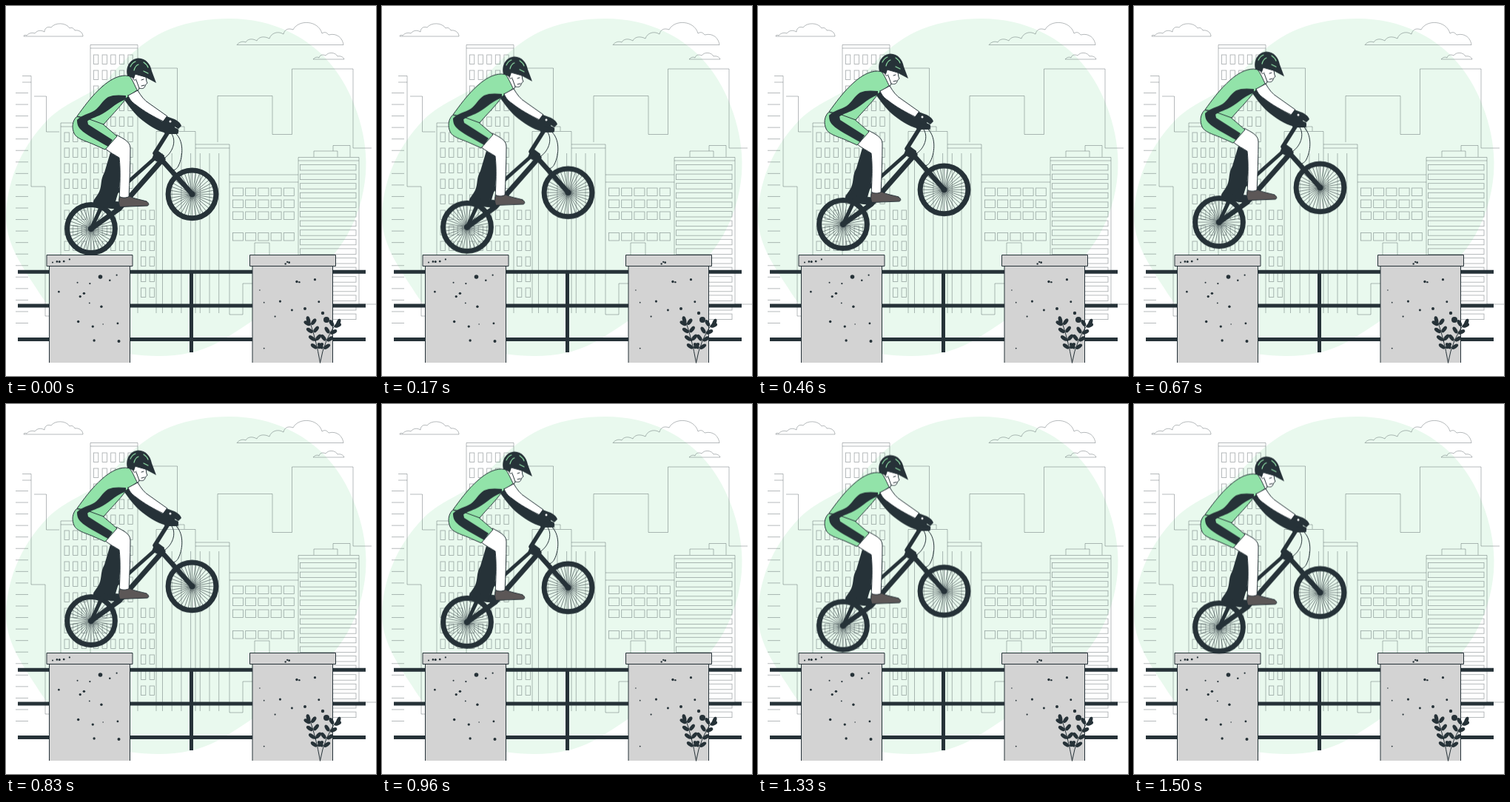
Write an HTML page that moves like this. It is 500 px wide and 500 px high and loops after 1540 ms.

```html
<!DOCTYPE html>
<html lang="en">
<head>
<meta charset="utf-8">
<title>Bike jump</title>
<style>
html, body { margin: 0; width: 100%; height: 100%; overflow: hidden; background: #fff; }
svg { display: block; width: 100vw; height: 100vh; }
.city { fill: none; stroke: #263238; stroke-width: .8; stroke-opacity: .42; }
.rail { fill: none; stroke: #263238; stroke-width: 5; }
.stone { fill: #d3d3d3; stroke: #263238; stroke-width: 1; }
.ink { fill: #263238; }
.green { fill: #92e3a9; }
.skin { fill: #fff; }
.shoe { fill: #5c5757; }
.line { fill: none; }
.edge { stroke: #263238; stroke-width: 1; stroke-linejoin: round; stroke-linecap: round; }
.tube { fill: none; stroke: #263238; stroke-linecap: round; stroke-linejoin: round; }
#rider { animation: hop 1540ms linear infinite; }
@keyframes hop {
  0%, 100% { transform: translateY(0); }
  46.4% { transform: translateY(-9.4px); }
  96.8% { transform: translateY(.6px); }
}
</style>
</head>
<body>
<svg viewBox="0 0 500 500">
  <path fill="#e9f9ee" d="M302 17C360 17 412 42 444 85C474 125 490 182 486 227C481 288 452 338 404 372C364 404 325 433 286 455C250 474 210 476 165 470C110 462 68 426 40 380C17 345 0 318 0 284C1 240 18 194 55 155C84 126 116 122 139 97C164 67 190 44 222 31C248 21 275 17 302 17Z"/>

  <g class="city">
    <g id="blocks"></g>
    <path d="M22 94.500H34V244H53V419H59M22 103H34M38 122H54.500V170H72"/>
    <path d="M74 336V158H114M74 163H114M114 336V52.500H178V415M114 57H178"/>
    <path d="M178 84H231.500V168M203 415V169.500H256V415M233 169V163H241V169M256 187H302V417H320V375H333M256 192H302"/>
    <path d="M286 184V121.500H360V173.500H386.500V85H469V192H494"/>
    <path d="M302 228H395M302 238H395M336 336V320H356V336"/>
    <path d="M395 336V204.500H477V403M395 209H477M416 204V196H448V204M442 196V188.500H465V204M477 403H500"/>
    <path d="M24 41H104C104 36 99 32 93 33C91 29 88 29 86 30C81 22 66 22 61 29C55 27 52 31 52 35C47 32 42 33 39 37C34 35 29 38 28 40C26 39 24 39 24 41Z"/>
    <path d="M312 52.500H456C455 44 448 36 436 39C433 35 430 35 427 37C422 19 395 18 388 32C380 29 376 33 375 38C367 33 358 37 356 44C348 40 341 42 339 47C332 43 326 45 324 49C319 47 315 49 312 52.500Z"/>
    <path d="M415 72H457C456 69 452 67 448 68C445 62 435 62 432 67C428 65 424 66 423 70C420 68 417 70 415 72Z"/>
  </g>

  <path class="rail" d="M16 359.300H486M16 405H486M16 450.500H486M250.500 359V468"/>

  <path class="stone" d="M58.500 482V351H167.500V482M333 482V351H441.500V482"/>
  <path class="stone" d="M55 336.500H171V351.500H55ZM329.500 336.500H445.500V351.500H329.500Z"/>
  <g id="specks" class="ink">
    <circle cx="127.500" cy="366" r="2.800"/>
    <circle cx="152.500" cy="453" r="2"/>
    <circle cx="404" cy="409" r="2"/>
    <circle cx="428" cy="415" r="2.200"/>
    <circle cx="433" cy="424" r="4"/>
  </g>
  <g id="plant" class="ink"></g>

  <g id="rider">
    <g id="wheels"></g>

    <!-- far leg -->
    <path class="ink" d="M141 198L153 205C155 222 155 240 151 254L148 264L154 270L150 274C138 275 127 271 118 267C117 262 122 259 126 251C130 241 127 236 133 225Z"/>

    <!-- frame -->
    <path class="tube" stroke-width="5" d="M115 301L130 269L204 203"/>
    <path class="tube" stroke-width="7" d="M115 301L153 274L212 207"/>
    <path class="tube" stroke-width="6.500" d="M206 203L251.500 254"/>
    <path class="tube" stroke-width="5.500" d="M201 199L218 172"/>
    <path class="ink" d="M202 193L214 202L212 214L197 207Z"/>
    <path class="tube" stroke-width="4" d="M216 171L231 171"/>
    <path class="edge line" d="M229 172C240 181 240 202 233 216C231 220 228 222 225 222M224 173C232 185 222 203 211 207"/>
    <circle class="ink" cx="150" cy="270" r="6"/>

    <!-- far arm -->
    <path class="ink" d="M160 123L170 120C180 136 191 142 203 151L220 161L232 166C235 169 232 173 225 173C213 173 200 166 189 158C176 149 168 138 160 127Z"/>

    <!-- near leg -->
    <path class="skin edge" d="M133 192L149 174C158 179 168 183 168 192C168 214 167 236 166 260L153 262C154 242 155 222 153 205C147 201 140 198 133 192Z"/>
    <path class="shoe edge" d="M154 258C159 260 164 259 167 257C174 261 184 262 190 264C193 266 194 269 191 270L154 271.500C152 267 152 262 154 258Z"/>

    <!-- shorts -->
    <path class="green edge" d="M95 150C89 156 89 165 92 172C95 179 106 182 116 186L134 194L150 176L122 152Z"/>
    <path class="ink" d="M96 154L109 150L111 160L144 181L138 190C122 181 108 174 101 167C97 163 96 159 96 154Z"/>

    <!-- shirt -->
    <path class="green edge" d="M161 94C150 94 139 101 130 109C116 121 104 138 96 149L110 152L132 160C141 149 152 139 163 124L178 113C176 106 172 98 168 95Z"/>
    <path class="ink" d="M162 121C153 120 144 120 138 123C130 128 127 136 120 141C112 146 102 147 96 154L108 158C111 153 119 151 126 148C138 143 146 132 162 126Z"/>

    <!-- near arm -->
    <path class="skin edge" d="M165 121L178 114C182 121 187 128 194 132L218 149L213 156C200 150 186 142 176 134C170 130 167 126 165 121Z"/>
    <path class="ink" d="M217 149L225 152C231 154 236 158 237 162L233 166L228 163L229 168L219 165L211 157Z"/>
    <circle class="skin" cx="222" cy="156" r="1.500"/>

    <!-- head -->
    <path class="skin edge" d="M167 90L189 96C190 99 189 101 191 104C190 106 188 106 188 108C187 112 183 112 180 111L178 115C174 108 171 99 167 95Z"/>
    <path class="edge line" d="M172 95C170 99 174 102 176 99M176 100L180 111M183 108L187 107M183 100L186 99"/>
    <path class="ink" d="M164 94C161 82 168 71 179 70.500C189 71 195 78 197 88L203 104L188 96L175 92L173 98L168 96Z"/>
    <path fill="none" stroke="#92e3a9" stroke-width="1.200" stroke-linecap="round" d="M168 82C170 78 172 76 175 75M173 87C174 83 176 80 179 79M186 76C189 78 191 80 192 83M186 88L192 91"/>
  </g>
</svg>
<script>
const svgNs = 'http://www.w3.org/2000/svg';
const get = id => document.getElementById(id);

function add(parent, tag, attrs) {
  const el = document.createElementNS(svgNs, tag);
  for (const key in attrs) el.setAttribute(key, attrs[key]);
  parent.append(el);
}

function repeat(count, draw) {
  for (let i = 0; i < count; i++) draw(i);
}

const city = get('blocks');
const pane = (x, y, width, height) => add(city, 'rect', { x, y, width, height });
const stroke = d => add(city, 'path', { d });

// All three towers share one window raster.
function tower(x, cols, firstRow, lastRow) {
  for (let row = firstRow; row <= lastRow; row++)
    repeat(cols, col => pane(x + col * 11.6, 66 + row * 21, 6.3, 12.5));
}

tower(118.5, 5, 0, 12);
tower(79, 3, 5, 12);
tower(182.5, 2, 10, 15);
repeat(5, col => {
  const x = 306.5 + col * 17.2;
  repeat(3, row => pane(x, 246 + row * 16, 14, 10.5));
  pane(x, 306.5, 14, 10.5);
});
repeat(17, i => pane(397.5, 214.5 + i * 12.6, 75.5, 7.5));
repeat(21, i => stroke(`M13 ${117.5 + i * 15.55}H30`));
repeat(7, i => stroke(`M${211.5 + i * 12.7} 199V415`));

let seed = 7;
function random() {
  seed = (seed * 16807) % 2147483647;
  return seed / 2147483647;
}

function scatter(count, x, y, width, height) {
  repeat(count, () => add(get('specks'), 'circle', {
    cx: x + random() * width,
    cy: y + random() * height,
    r: .7 + random() * 1.1
  }));
}

scatter(5, 63, 341, 28, 6);
scatter(14, 66, 358, 92, 103);
scatter(3, 366, 344, 50, 5);
scatter(13, 342, 358, 86, 105);

// A quadratic stem from the ground to (tipX, tipY), with leaves in pairs.
function stem(tipX, tipY, bendX) {
  const [rootX, rootY, bendY] = [424.5, 482, 450];
  const plant = get('plant');
  const bezier = (a, b, c, t) => (1 - t) ** 2 * a + 2 * t * (1 - t) * b + t * t * c;
  const leaf = (x, y, angle) => add(plant, 'ellipse', {
    cy: -6, rx: 2.6, ry: 5, transform: `translate(${x} ${y}) rotate(${angle})`
  });
  add(plant, 'path', {
    class: 'edge line',
    d: `M${rootX} ${rootY}Q${bendX} ${bendY} ${tipX} ${tipY}`
  });
  for (let t = .3; t < 1; t += .19) {
    const x = bezier(rootX, bendX, tipX, t);
    const y = bezier(rootY, bendY, tipY, t);
    const lean = (tipX - rootX) * t;
    leaf(x, y, lean - 48);
    leaf(x, y, lean + 48);
  }
  leaf(tipX, tipY + 5, tipX - rootX);
}

stem(410, 425, 419);
stem(447, 428, 430);

function wheel(cx, cy) {
  const wheels = get('wheels');
  repeat(36, i => add(wheels, 'path', {
    d: `M${cx} ${cy}h30`,
    transform: `rotate(${i * 10} ${cx} ${cy})`,
    stroke: '#263238',
    'stroke-width': .55
  }));
  add(wheels, 'circle', { cx, cy, r: 32.4, class: 'tube', 'stroke-width': 7 });
  add(wheels, 'circle', { cx, cy, r: 4, class: 'ink' });
}

wheel(115, 301);
wheel(251.5, 254.3);
</script>
</body>
</html>
```
